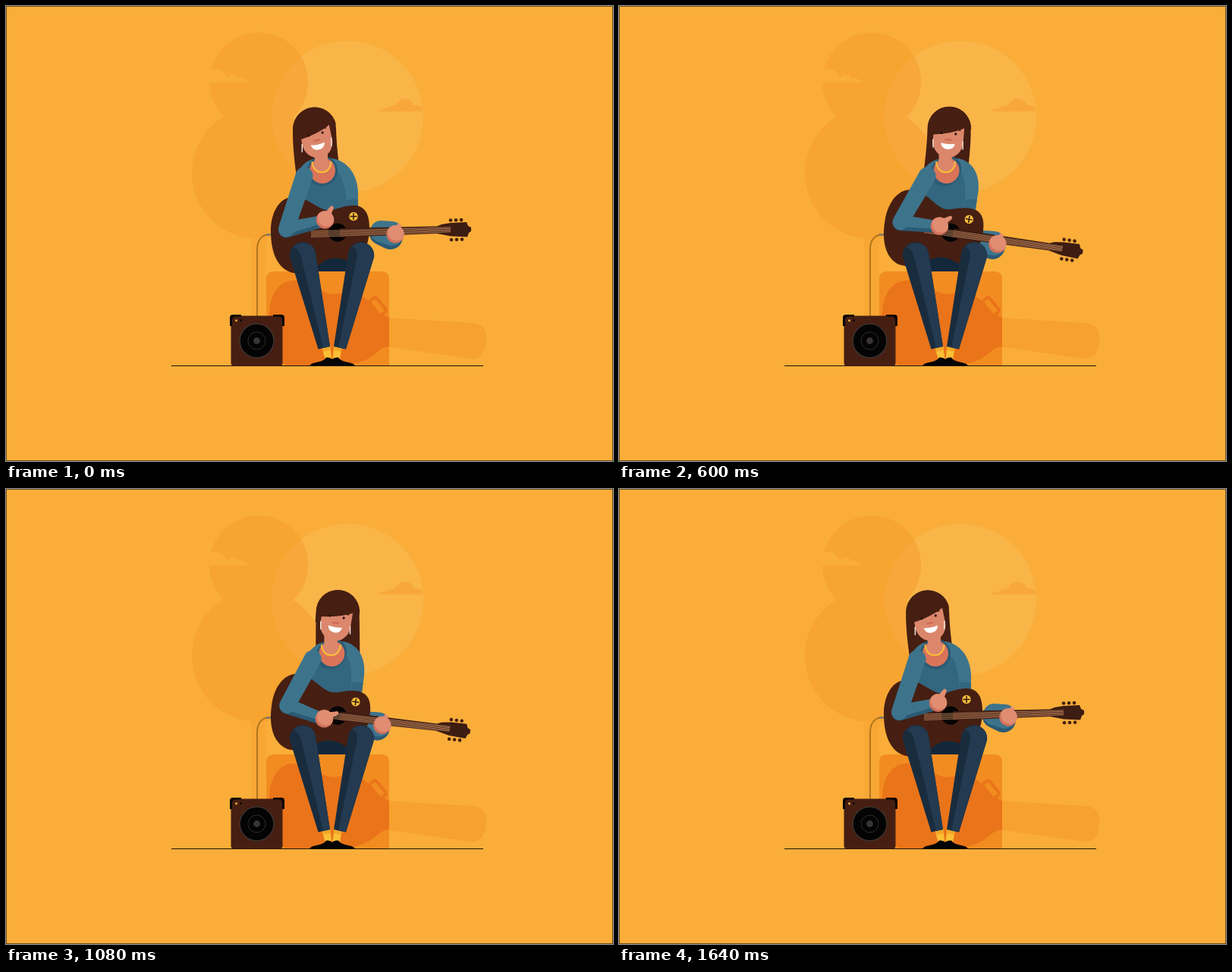
An HTML page with a canvas for the animation above (1680 ms loop, 800 px wide and 600 px high).

```html
<!DOCTYPE html>
<html lang="en">
<head>
<meta charset="utf-8">
<title>Guitar player</title>
<style>
html, body { margin: 0; width: 100%; height: 100%; overflow: hidden; background: #faae39; }
canvas { display: block; width: 800px; height: 600px; }
</style>
</head>
<body>
<canvas id="stage" width="800" height="600"></canvas>
<script>
const ctx = document.getElementById('stage').getContext('2d');
const LOOP = 1680, STEP = 40, RAD = Math.PI / 180;

const C = {
  bg: '#faae39', tree: '#f7a431', moon: '#fab549', haze: '#f8a83a',
  box: '#f28c20', caseBody: '#ea7419', caseNeck: '#f7a12f',
  wood: '#461f12', neckWood: '#3d1c12', string: '#b07a55', black: '#050404',
  sky: '#3d748c', sea: '#33667f', deep: '#2b5a74',
  jean: '#233a50', jeanDark: '#192c3e', seat: '#12283a',
  skin: '#dc876c', skinDark: '#d2715b', yellow: '#fbbf36', sock: '#f3a827'
};

// Motion helpers
const clamp = v => Math.max(0, Math.min(1, v));
const ease = (t, a, b) => { const u = clamp((t - a) / (b - a)); return u * u * (3 - 2 * u); };
const pulse = (t, a, b, c, d) => ease(t, a, b) - ease(t, c, d);

function poseAt(t) {
  const beat = t % 840;
  return {
    lean: pulse(t, 85, 655, 930, 1500),
    tilt: pulse(t, 150, 870, 925, 1680),
    hair: -6.4 * Math.cos(2 * Math.PI * (t - 670) / LOOP),
    tap: pulse(t % 560, 60, 240, 390, 515),
    strum: pulse(beat, 100, 340, 420, 680),
    wrist: pulse(beat, 20, 330, 440, 730),
    slide: pulse(t, 330, 780, 960, 1360)
  };
}

// Drawing helpers
function fill(path, color) {
  ctx.fillStyle = color;
  ctx.fill(typeof path === 'string' ? new Path2D(path) : path);
}
function stroke(path, color, width, cap = 'butt') {
  ctx.strokeStyle = color;
  ctx.lineWidth = width;
  ctx.lineCap = cap;
  ctx.stroke(new Path2D(path));
}
function disc(x, y, r, color) {
  ctx.fillStyle = color;
  ctx.beginPath();
  ctx.arc(x, y, r, 0, 2 * Math.PI);
  ctx.fill();
}
function ring(x, y, r, color, width) {
  ctx.strokeStyle = color;
  ctx.lineWidth = width;
  ctx.beginPath();
  ctx.arc(x, y, r, 0, 2 * Math.PI);
  ctx.stroke();
}
function group(draw) {
  ctx.save();
  draw();
  ctx.restore();
}
function rotateAround(x, y, degrees) {
  ctx.translate(x, y);
  ctx.rotate(degrees * RAD);
  ctx.translate(-x, -y);
}
// Hull of two circles
function limb(x1, y1, r1, x2, y2, r2, color) {
  const a = Math.atan2(y2 - y1, x2 - x1);
  const b = Math.acos((r1 - r2) / Math.hypot(x2 - x1, y2 - y1));
  ctx.fillStyle = color;
  ctx.beginPath();
  ctx.arc(x1, y1, r1, a + b, a - b + 2 * Math.PI);
  ctx.arc(x2, y2, r2, a - b, a + b);
  ctx.fill();
}
function palm(x, y) {
  disc(x, y, 11.7, C.skinDark);
  group(() => {
    ctx.beginPath();
    ctx.arc(x, y, 11.7, 0, 2 * Math.PI);
    ctx.clip();
    disc(x + 2, y - 3, 11.7, '#e08d72');
  });
}

function scenery() {
  ctx.fillStyle = C.bg;
  ctx.fillRect(0, 0, 800, 600);
  disc(450, 146, 100, C.moon);
  disc(333, 100, 65, C.tree);
  disc(332, 220, 87, C.tree);
  ctx.fillStyle = '#f8a734';
  ctx.fillRect(323, 306, 20, 103);

  group(() => {
    const crowns = new Path2D();
    crowns.arc(333, 100, 65, 0, 7);
    crowns.moveTo(419, 220);
    crowns.arc(332, 220, 87, 0, 7);
    ctx.clip(crowns);
    disc(450, 146, 100, C.haze);
  });

  fill('M262 101 V88 Q270 82 279 83 Q288 85 291 95 Q295 89 300 91 Q306 92 307 96 Q312 92 315 97 L320 98 V101Z', C.bg);
  fill('M491 139 Q493 135 501 135 Q507 130 512 132 Q517 123 526 122 Q535 123 538 131 Q545 129 549 135 V139Z', C.haze);

  fill('M500 411 L614 418 Q633 419 633 437 Q633 467 612 465 L500 449Z', C.caseNeck);
  fill('M343 474 V360 Q343 350 353 350 H495 Q505 350 505 360 V474Z', C.box);
  fill('M347 408 C347 380 360 362 380 362 C402 362 412 377 430 380 C446 379 456 376 470 383 ' +
    'C482 389 488 404 505 411 V449 C490 450 487 464 465 470 L450 474 H368 C352 457 347 430 347 408Z', C.caseBody);
  group(() => {
    rotateAround(490, 396, -40);
    ctx.strokeStyle = C.caseBody;
    ctx.lineWidth = 4;
    ctx.fillStyle = C.box;
    ctx.beginPath();
    ctx.roundRect(484.5, 384, 11, 24, 3);
    ctx.fill();
    ctx.stroke();
  });

  stroke('M331 409 V321 C331 308 338 301.5 346 301.5', '#b0751f', 2);
  stroke('M343 301.8 L350 301.5', '#7d776c', 2.5);
  ctx.fillStyle = '#1d140c';
  ctx.fillRect(218, 474, 411, 1);
}

function amp(tap) {
  ctx.fillStyle = C.wood;
  ctx.beginPath();
  ctx.roundRect(296.5, 408.5, 68, 66, 4);
  ctx.fill();
  const corner = 'M295 422 V411 Q295 407 299 407 H310 V409.5 H302 Q298 410 298 414 V422Z';
  fill(corner, C.black);
  group(() => {
    ctx.translate(662, 0);
    ctx.scale(-1, 1);
    fill(corner, C.black);
  });
  disc(303.5, 414.7, 1.5, '#fbb03b');
  disc(309.5, 414.7, 1.4, C.black);
  const x = 330.5, y = 441.5;
  disc(x, y, 22.2 + tap, C.black);
  ring(x, y, 22.4 + tap, '#3b3533', 1.4);
  ring(x, y, 11.5 + tap * 0.4, '#36302f', 0.9);
  disc(x, y, 4.4, '#3a3535');
}

function backHair(domeX, domeY, swing) {
  const l = domeX - 28.5, r = domeX + 28.5, low = 227;
  fill(`M${l} ${domeY} A28.5 28.5 0 0 1 ${r} ${domeY} Q${r + 0.5} ${domeY + 25} ${r + swing + 1} ${low} ` +
    `H${l + swing} Q${l - 0.5} ${domeY + 25} ${l} ${domeY}Z`, C.wood);
}

function torso(lean) {
  group(() => {
    const k = lean * 15 / 92;
    ctx.transform(1, 0, -k, 1, k * 305, 0);
    fill('M404 202 C390 206 382 221 380 233 L391 252 V272 H464 L464 245 C463 222 450 204 430 201Z', C.sky);
    fill('M392 272 V240 C392 224 402 213 418 213 C440 213 448 228 449 272Z', C.sea);
    fill('M449 256 Q457 253 464 256 V272 H449Z', C.sea);
    disc(417, 217.5, 20, C.deep);
  });
}

function neck(x) {
  group(() => {
    ctx.translate(x, 0);
    disc(1, 217, 17, '#da7459');
    fill('M-9 190 H8 V204 Q15 208 13 211 Q8 219 0 219 Q-9 219 -13 210 Q-9 206 -9 204Z', C.skin);
    stroke('M-12.5 205 C-12.5 224 12.5 224 12.5 205', C.yellow, 2);
  });
}

function head(x, degrees) {
  group(() => {
    ctx.translate(x, 210);
    ctx.rotate(degrees * RAD);
    fill('M-20 -58 V-30 C-19 -17 -8 -10 0 -10 C9 -10 19 -17 20 -30 V-58Z', C.skin);
    fill('M-28 -49 A28.5 28.5 0 0 1 29 -49 L21.5 -51 Q5 -42 -21 -39 L-27 -30Z', C.wood);
    disc(-9.3, -42, 1.6, '#24130e');
    disc(9.3, -42, 1.6, '#24130e');
    stroke('M7 -47.2 Q11 -49 15.5 -46.8', C.wood, 1.8);
    stroke('M-3.5 -33.8 H3.5', '#cd6955', 2.4, 'round');
    fill('M-9.3 -29 Q0 -27 9.3 -29 Q8 -21 0 -21 Q-8 -21 -9.3 -29Z', '#fff');
    for (const side of [-20, 19.3]) {
      group(() => {
        ctx.translate(side, -33);
        ctx.rotate(-degrees * RAD);
        stroke('M0 0 V11', '#ece2da', 1.5);
      });
    }
  });
}

function guitar(lean) {
  group(() => {
    rotateAround(437, 299, 10 * lean);
    fill('M349 297 C349 272 360 254 376 252 C392 250 402 261 418 268 C430 273 440 263 458 263 ' +
      'C474 263 479 276 479 292 C479 312 472 335 452 337 C437 330 424 331 412 342 ' +
      'C402 351 390 353 378 352 C358 347 349 325 349 297Z', C.wood);
    disc(437, 298.7, 12.2, C.black);
    disc(458, 277.5, 5.7, C.yellow);
    stroke('M453.5 277.5 H462.5 M458 273 V282', '#2b1710', 1.5);
    fill('M440 293 L568 290.5 L574 288 L586 286 L607 285 L609 290 L613 292 V297 L610 299 L608 304.5 L586 303.5 L568 300 L440 305Z', C.neckWood);
    for (let i = 0; i < 5; i++) {
      stroke(`M402 ${297 + i * 1.9} L586 ${291.8 + i * 1.5}`, C.string, 0.9);
    }
    for (let i = 0; i < 3; i++) {
      disc(586 + 7 * i, 282.5 - 0.2 * i, 2.3, C.wood);
      disc(587 + 7 * i, 308.2 - 0.2 * i, 2.3, C.wood);
    }
  });
}

function shoe(draw) {
  fill('M430 474.5 V466 Q432 463 438 463.5 Q441 468 449 469.5 Q459 471 460 474.5Z', C.black);
}

function legs(tap) {
  // Planted leg
  fill('M416 449 L427 447 L429.5 467 L421 467Z', C.yellow);
  fill('M416 449 L427 447 L428 454 L418 456Z', C.sock);
  group(() => {
    ctx.translate(860, 0);
    ctx.scale(-1, 1);
    shoe();
  });
  fill('M374 331 A17 17 0 0 1 408 326 L427 449 L411.5 452.5Z', C.jeanDark);
  fill('M379 318 Q384 312 391 312 Q406 313 408 326 L427 449 L418 451 L389 331 Q387 321 379 318Z', C.jean);

  // Tapping leg
  group(() => {
    ctx.translate(1.3 * tap, -5 * tap);
    fill('M432.5 447 L443 449 L439.5 468 L430.5 467Z', C.yellow);
    fill('M432.5 447 L443 449 L441 456 L432 454Z', C.sock);
  });
  group(() => {
    ctx.translate(-2 * tap, 0);
    rotateAround(460, 474, 14 * tap);
    shoe();
  });
  const x = 1.2 * tap, kneeY = 329 - 3 * tap, hemY = 449 - 5 * tap;
  fill(`M${451 + x} ${kneeY - 3} A17 17 0 0 1 ${485 + x} ${kneeY + 2} L${448 + x} ${hemY + 3.5} L${432 + x} ${hemY}Z`, C.jeanDark);
  fill(`M${456 + x} ${kneeY - 12} A17 17 0 0 1 ${485 + x} ${kneeY + 2} L${448 + x} ${hemY + 3.5} L${438 + x} ${hemY + 1.5} ` +
    `L${463 + x} ${kneeY} Q${463 + x} ${kneeY - 9} ${456 + x} ${kneeY - 12}Z`, C.jean);
}

function frettingHand(p, sleeve) {
  const x = 513 - 22 * p.slide;
  const y = 301 + (x - 437) * Math.sin(10 * p.lean * RAD) + 2.5 * p.lean;
  if (sleeve) {
    limb(x - 19, y - 1, 15, x - 6.5, y + 3.5, 16.5, C.deep);
    limb(x - 19, y - 4, 14, x - 5, y - 1, 16, C.sky);
  } else {
    limb(x + 1, y - 2, 6, x + 5, y - 11, 3, '#e08d72');
    palm(x, y);
  }
}

function strummingArm(p) {
  const sx = 393 + 13.5 * p.lean, sy = 224;
  const ex = 369.5 + 1.5 * p.lean, ey = 295 - 9 * p.lean - 2 * p.strum;
  const upX = 420.5 + 3.5 * p.lean, upY = 282 + p.lean;
  const hx = upX + (417 - upX) * p.strum, hy = upY + (315 - upY) * p.strum;
  const a = Math.atan2(hy - ey, hx - ex);
  const wx = hx - 9 * Math.cos(a), wy = hy - 9 * Math.sin(a) + 1;
  const finger = (-61 + 8 * p.lean * (1 - p.wrist) + 45 * p.wrist) * RAD;

  limb(ex, ey, 10.5, wx, wy, 8, C.deep);
  limb(sx, sy, 11.5, ex, ey - 1, 10.5, C.sky);
  limb(ex + 1, ey - 2.5, 8, wx + 2 * Math.sin(a), wy - 2.5, 5.5, C.sky);
  const tipX = hx + 18 * Math.cos(finger), tipY = hy + 18 * Math.sin(finger);
  palm(hx, hy);
  limb(hx + 1, hy - 3, 5, tipX, tipY, 2.5, '#e08d72');
}

function draw(t) {
  const p = poseAt(t);
  const neckX = 416 + 15 * p.lean;
  const degrees = -12 + 24 * p.tilt, turn = degrees * RAD;
  scenery();
  amp(p.tap);
  backHair(neckX + 0.7 + 49 * Math.sin(turn), 210 - 49 * Math.cos(turn), p.hair);
  fill('M402 315 H457 V350 H402Z', C.seat);
  torso(p.lean);
  neck(neckX);
  head(neckX + 0.7, degrees);
  frettingHand(p, true);
  guitar(p.lean);
  frettingHand(p, false);
  legs(p.tap);
  strummingArm(p);
  ctx.strokeStyle = '#6f5020';
  ctx.lineWidth = 1;
  ctx.strokeRect(0.5, 0.5, 799, 599);
}

function tick() {
  draw(Math.floor(performance.now() % LOOP / STEP) * STEP);
  requestAnimationFrame(tick);
}
tick();
</script>
</body>
</html>
```
